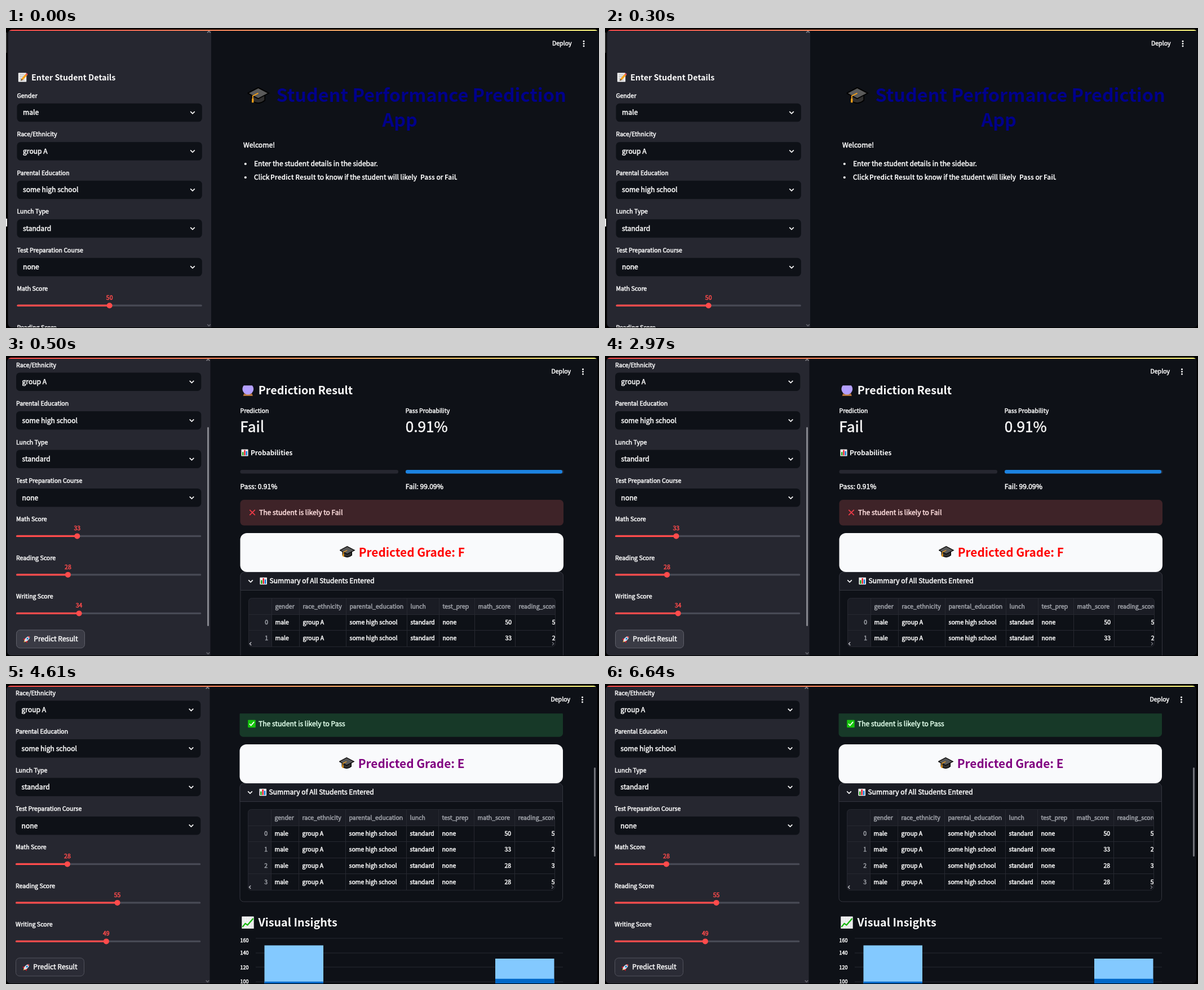
An HTML page with a canvas that plays this animation: 1052x532 px, repeating every 8000 ms.

```html
<!DOCTYPE html>
<html lang="en">
<head>
<meta charset="utf-8">
<title>Student Performance Prediction App</title>
<style>
html, body { margin: 0; width: 100%; height: 100%; overflow: hidden; background: #000; }
canvas { display: block; width: 1052px; height: 532px; }
</style>
</head>
<body>
<canvas id="stage" width="1052" height="532"></canvas>
<script>
const ctx = document.getElementById('stage').getContext('2d');
const FONT = '"Noto Sans CJK JP", "Noto Sans CJK SC", "Noto Sans CJK", "Open Sans", sans-serif';
const BG = '#0e1117', SIDE = '#262730', INK = '#fafafa', RED = '#ff4b4b';
const BODY = 12.1, LABEL = 10.55, HEAD = 19.75;

function rect(x, y, w, h, fill, r = 0, stroke) {
  ctx.beginPath();
  ctx.roundRect(x, y, w, h, r);
  if (fill) { ctx.fillStyle = fill; ctx.fill(); }
  if (stroke) { ctx.strokeStyle = stroke; ctx.lineWidth = 1; ctx.stroke(); }
}

function line(points, color, width) {
  ctx.beginPath();
  points.forEach(([x, y]) => ctx.lineTo(x, y));
  ctx.strokeStyle = color;
  ctx.lineWidth = width;
  ctx.stroke();
}

function poly(points, fill) {
  ctx.beginPath();
  points.forEach(([x, y]) => ctx.lineTo(x, y));
  ctx.closePath();
  ctx.fillStyle = fill;
  ctx.fill();
}

function disc(x, y, r, fill) {
  ctx.beginPath();
  ctx.arc(x, y, r, 0, 7);
  ctx.fillStyle = fill;
  ctx.fill();
}

// y is the middle of the line; regular text is slightly thickened
function text(str, x, y, size = BODY, { color = INK, bold = false, align = 'left' } = {}) {
  const base = y + size * 0.37;
  ctx.font = `${bold ? 700 : 400} ${size}px ${FONT}`;
  ctx.textAlign = align;
  ctx.fillStyle = color;
  ctx.fillText(str, x, base);
  if (!bold) {
    ctx.strokeStyle = color;
    ctx.lineWidth = 0.5;
    ctx.strokeText(str, x, base);
  }
}

function chevron(x, y, w, h, color = INK, width = 1.7) {
  line([[x - w, y - h], [x, y + h], [x + w, y - h]], color, width);
}

// icons live in a 20-unit box around the origin
const icons = {
  memo() {
    rect(-8.5, -9, 16, 18, '#f0f0f0', 1);
    for (let y = -5; y < 8; y += 3.5) line([[-6, y], [4, y]], '#9a9a9a', 1);
    line([[-1, 4], [8, -6]], '#f7a11a', 4);
    line([[-3, 6], [-1, 4]], '#6b4a2b', 2.5);
    disc(8, -6, 2, '#e8505b');
  },
  cap() {
    ctx.beginPath();
    ctx.moveTo(-6, -1);
    ctx.lineTo(-6, 4.5);
    ctx.quadraticCurveTo(0, 9.5, 6, 4.5);
    ctx.lineTo(6, -1);
    ctx.fillStyle = '#302f2f';
    ctx.fill();
    ctx.strokeStyle = '#000';
    ctx.lineWidth = 0.9;
    ctx.stroke();
    const board = [[-9.6, -2], [0, -7], [9.6, -2], [0, 3]];
    poly(board, '#5a5a5a');
    line([...board, board[0]], '#000', 0.9);
    line([[0, -2], [-5, 0.5], [-5, 4]], '#f7a11a', 0.9);
    line([[-5, 3], [-5, 6.5]], '#f7a11a', 1.7);
  },
  ball() {
    poly([[-6, 4], [6, 4], [8, 9], [-8, 9]], '#8e562e');
    disc(0, -2.2, 9, '#b4a0ff');
    line([[-7, 7.4], [7, 7.4]], '#e39d51', 1.2);
  },
  bars() {
    rect(-9, -9, 18, 18, '#f2f2f2', 1);
    rect(-6.5, -2, 3.4, 9, '#13a10e');
    rect(-1.7, -7, 3.4, 14, '#e81224');
    rect(3.1, -4, 3.4, 11, '#0078d7');
  },
  cross() {
    line([[-7, -7], [7, 7]], '#f03a47', 2.6);
    line([[-7, 7], [7, -7]], '#f03a47', 2.6);
  },
  check() {
    rect(-9, -9, 18, 18, '#16c60c', 1);
    line([[-5.5, 0], [-1.8, 4], [5.5, -4.5]], '#fff', 2.4);
  },
  rise() {
    rect(-9.5, -9.5, 19, 19, '#f2f2f2', 0.5);
    for (let k = -6; k < 9; k += 4) {
      line([[k, -9], [k, 9]], '#d8dce0', 0.5);
      line([[-9, k], [9, k]], '#d8dce0', 0.5);
    }
    line([[-8.5, 7], [-4, 1.5], [-0.5, 4], [8.5, -6.5]], '#16b60c', 2);
  },
  rocket() {
    ctx.rotate(Math.PI / 4);
    poly([[-4, 1], [-8, 7], [-3, 7], [3, 7], [8, 7], [4, 1]], '#e81224');
    poly([[-2.5, 7], [2.5, 7], [0, 12]], '#f7a11a');
    ctx.beginPath();
    ctx.ellipse(0, -1, 4.5, 9.5, 0, 0, 7);
    ctx.fillStyle = '#d9dde2';
    ctx.fill();
    poly([[-3, -7], [0, -11], [3, -7]], '#e81224');
    disc(0, -2.5, 2.4, '#0078d7');
  }
};

function icon(name, x, y, size) {
  ctx.save();
  ctx.translate(x, y);
  ctx.scale(size / 20, size / 20);
  icons[name]();
  ctx.restore();
}

const fields = [
  ['Gender', 'male'], ['Race/Ethnicity', 'group A'], ['Parental Education', 'some high school'],
  ['Lunch Type', 'standard'], ['Test Preparation Course', 'none']
];
const PITCH = 68.5, WIDE = 328.3;

function sidebar(x, scroll, scores, button) {
  ctx.save();
  ctx.translate(x, 0);
  rect(-20, 4, 364.5, 528, SIDE);
  ctx.translate(0, -scroll);
  icon('memo', 10, 87.5, 18);
  text('Enter Student Details', 25.5, 87.7, 14.3, { bold: true });
  fields.forEach(([label, value], i) => {
    const y = 150 + i * PITCH;
    text(label, 0, y - 30, LABEL);
    rect(0, y - 16.3, WIDE, 32.6, BG, 6.5);
    text(value, 10.5, y);
    chevron(311.5, y, 3.8, 1.9);
  });
  ['Math', 'Reading', 'Writing'].forEach((name, i) => {
    const y = 492.2 + i * PITCH, at = WIDE * scores[i] / 100;
    text(name + ' Score', 0, y - 30, LABEL);
    text(scores[i], at, y - 14.2, LABEL, { color: RED, align: 'center' });
    rect(0, y - 1.6, WIDE, 3.2, '#484a55', 1.6);
    rect(0, y - 1.6, at, 3.2, RED, 1.6);
    disc(at, y, 5, RED);
  });
  rect(0.5, 658.7, 121, 32, button[0], 6.5, button[1]);
  icon('rocket', 19, 675, 13);
  text('Predict Result', 31.3, 674.7);
  ctx.restore();
  chevron(x + 340.5, 7, 2.8, -1.4, '#85868d', 1.5);
  chevron(x + 340.5, 527, 2.8, 1.4, '#62636b', 1.5);
}

function toolbar(x) {
  text('Deploy', x + 949.5, 27.5, LABEL);
  for (const dy of [-4.3, 0, 4.3]) disc(x + 1005.5, 27.7 + dy, 1.5, INK);
}

function welcome() {
  const blue = { color: '#00008b', bold: true };
  icon('cap', 447.5, 119.5, 39);
  text('Student Performance Prediction', 479.5, 119.5, 32.4, blue);
  text('App', 667.5, 163.5, 32.4, blue);
  text('Welcome!', 421, 207.5, 12.2);
  disc(424.8, 241, 2.1, INK);
  disc(424.8, 265, 2.1, INK);
  text('Enter the student details in the sidebar.', 440, 240.8);
  const y = 264.8, b = { bold: true };
  text('Click', 440, y);
  text('Predict Result', 469, y, 11.7, b);
  text('to know if the student will likely', 552.5, y, 12);
  text('Pass', 735, y, 11.7, b);
  text('or', 763.5, y);
  text('Fail', 778, y, 11.7, b);
  text('.', 797.5, y);
}

function gradeCard(y, grade, color) {
  rect(415.5, y, 573.5, 69, '#f9fafc', 12);
  icon('cap', 605.3, y + 33.2, 27);
  text('Predicted Grade: ' + grade, 625.7, y + 34, 20.75, { color, bold: true });
}

const columns = [
  [471.5, 'gender', 'male'], [520.5, 'race_ethnicity', 'group A'],
  [603.5, 'parental_education', 'some high school'], [711.5, 'lunch', 'standard'],
  [768.5, 'test_prep', 'none'], [831.5, 'math_score'], [903.5, 'reading_score']
];

function summary(y, rows, end) {
  const edge = '#33353e', grid = '#262830', dim = '#a0a3aa', size = 10.45, step = 28.55;
  rect(416, y + 0.5, 572.5, end - y, BG, 6.5, edge);
  rect(416, y + 0.5, 572.5, 32, '#1a1c24', [6.5, 6.5, 0, 0], edge);
  chevron(434, y + 16.2, 3.8, 1.9);
  icon('bars', 456.7, y + 16, 14);
  text('Summary of All Students Entered', 467.5, y + 16);

  const top = y + 46, head = top + 29.5, bottom = head + rows.length * step;
  ctx.save();
  ctx.beginPath();
  ctx.roundRect(430, top, 545, bottom - top + 0.5, 6);
  ctx.clip();
  rect(430, top, 545, 29.5, '#1a1c24');
  rect(430, top, 41.5, bottom - top, '#1a1c24');
  columns.forEach(([x, name]) => {
    rect(x - 0.5, top, 1, bottom - top, grid);
    text(name, x + 6, top + 14.7, size, { color: dim });
  });
  rows.forEach(([math, reading], i) => {
    const mid = head + (i + 0.5) * step - 0.7;
    rect(430, Math.round(head + i * step) - 1, 545, 1, grid);
    text(i, 465, mid, size, { color: dim, align: 'right' });
    columns.forEach(([x, , value]) => value && text(value, x + 6, mid, size));
    text(math, 897, mid, size, { align: 'right' });
    text(reading, 968.7, mid, size);
  });
  ctx.restore();
  rect(430.5, top + 0.5, 544, bottom - top - 0.5, null, 6, grid);
  line([[435.2, bottom - 8.2], [432.4, bottom - 5.4], [435.2, bottom - 2.6]], '#b9bac0', 1.4);
  line([[969, bottom - 8.2], [971.8, bottom - 5.4], [969, bottom - 2.6]], '#6b6d75', 1.4);
}

function failView() {
  icon('ball', 429.3, 61, 22);
  text('Prediction Result', 447.7, 60.5, HEAD, { bold: true });
  text('Prediction', 415.5, 97, LABEL);
  text('Fail', 415.3, 125.8, 26.2);
  text('Pass Probability', 708.7, 97, LABEL);
  text('0.91%', 708.7, 125.8, 26.2);
  icon('bars', 423.5, 171.5, 13.5);
  text('Probabilities', 434, 171.9, 11.8, { bold: true });
  rect(415.5, 202, 280.5, 6.5, SIDE, 3.2);
  rect(709, 202, 280.5, 6.5, SIDE, 3.2);
  rect(709, 202, 278, 6.5, '#1c83e1', 3.2);
  text('Pass: 0.91%', 415.5, 232);
  text('Fail: 99.09%', 708.7, 232);
  rect(415.5, 255, 573.5, 45.5, '#3e2328', 6.5);
  icon('cross', 437, 277.5, 13.5);
  text('The student is likely to Fail', 449, 277.7, BODY, { color: '#ffdede' });
  gradeCard(314, 'F', '#ff0000');
  summary(383, [[50, 50], [33, 28]], 560);
}

function passView() {
  rect(415.5, 48, 573.5, 45.7, '#173928', 6.5);
  icon('check', 437, 70.5, 15);
  text('The student is likely to Pass', 449, 70.7, BODY, { color: '#dffde9' });
  gradeCard(107, 'E', '#800080');
  summary(176, [[50, 50], [33, 28], [28, 34], [28, 55]], 385.5);
  icon('rise', 430, 423, 22.5);
  text('Visual Insights', 448.5, 423, HEAD, { bold: true });

  for (let i = 0; i < 4; i++) {
    const y = 451 + i * 25.7;
    rect(444, Math.round(y) - 0.5, 545, 1, '#272a32');
    text(160 - i * 20, 431.5, i ? y : 454.7, 9, { align: 'right' });
  }
  for (const [x, top, base] of [[459.5, 463.5, 527.7], [869, 487, 522.7]]) {
    rect(x, top, 104.5, 80, '#83c9ff');
    rect(x, base, 104.5, 20, '#0068c9');
  }
}

const idle = ['#2b2c36', '#51525c'], hover = ['#3a3b45', '#5f606a'];
const scenes = [
  { until: 500, x: 19.5, scroll: 0, scores: [50, 50, 50], button: idle, shift: 0, view: welcome },
  { until: 4610, x: 18, scroll: 172.8, scores: [33, 28, 34], button: hover, shift: 0, view: failView },
  { until: 8000, x: 17, scroll: 172.8, scores: [28, 55, 49], button: idle, shift: -1, view: passView }
];

function draw() {
  const t = performance.now() % 8000;
  const s = scenes.find(scene => t < scene.until);
  const left = s.x - 16, right = s.x + 1032;
  rect(0, 0, 1052, 532, '#000');
  if (s.view === welcome) {
    rect(0, 8, 2, 36, '#2e2e2e');
    rect(0, 338, 2, 14, '#f4f4f4');
  }
  ctx.save();
  ctx.beginPath();
  ctx.roundRect(left, 3, right - left, 528, 7);
  ctx.clip();
  rect(0, 0, 1052, 532, BG);

  // the page scrolls beneath the toolbar
  ctx.save();
  ctx.translate(s.shift, 0);
  ctx.beginPath();
  ctx.rect(360, 52.3, 692, 480);
  ctx.clip();
  s.view();
  ctx.restore();

  sidebar(s.x, s.scroll, s.scores, s.button);
  toolbar(s.x);
  if (s.view === failView) rect(357, 126, 3, 353, '#85868d', 1.5);
  if (s.view === passView) rect(1043, 148, 3, 158, '#6f7178', 1.5);
  const glow = ctx.createLinearGradient(left, 0, right, 0);
  glow.addColorStop(0, RED);
  glow.addColorStop(1, '#fffd80');
  rect(left, 3, right - left, 2, glow);
  ctx.restore();
  requestAnimationFrame(draw);
}
draw();
</script>
</body>
</html>
```
